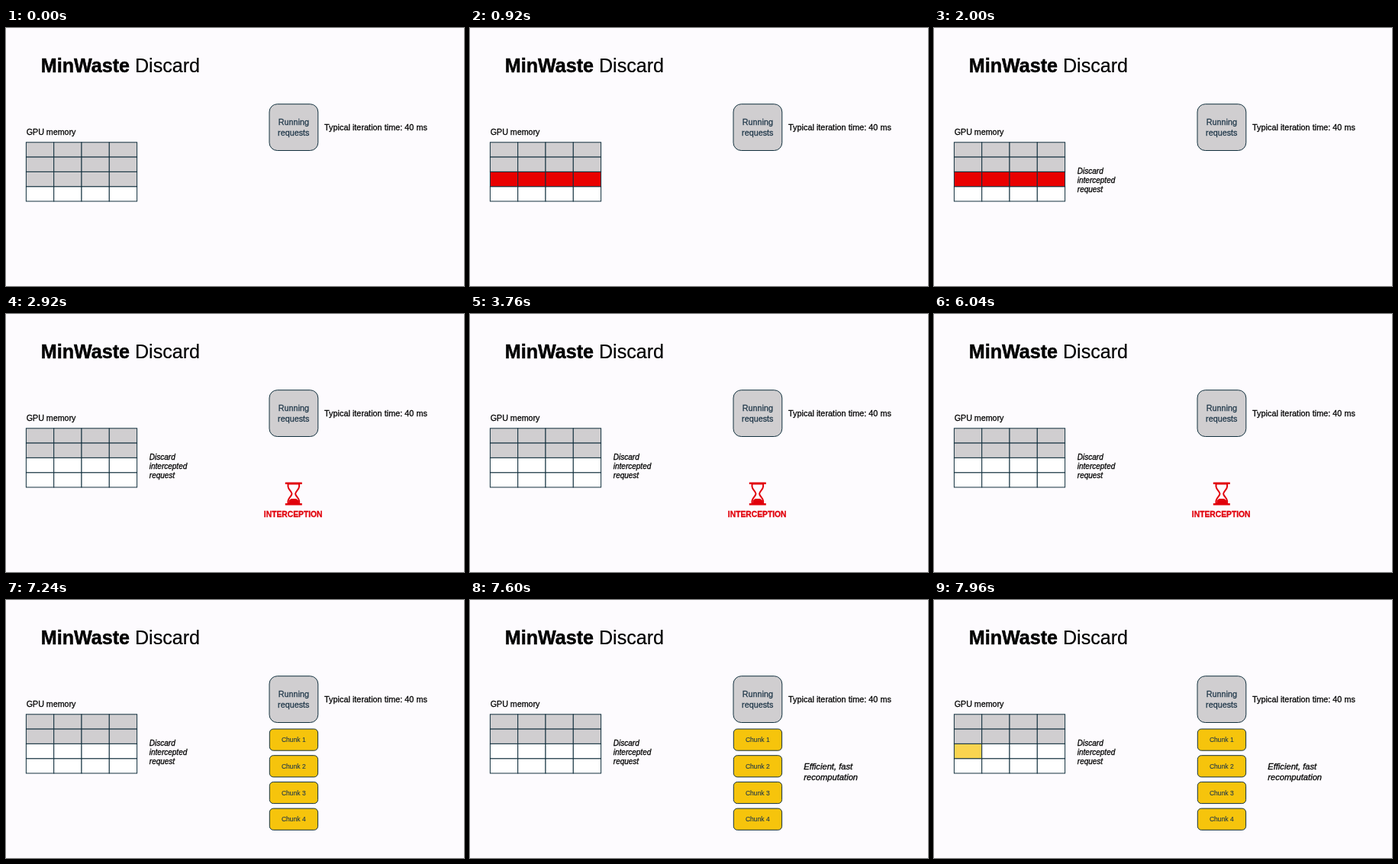
These frames come from a looping animation (600 px wide and 338 px high, 8000 ms). An HTML page:

```html
<!DOCTYPE html>
<html lang="en">
<head>
<meta charset="utf-8">
<title>MinWaste Discard</title>
<style>
  html, body { margin: 0; width: 100%; height: 100%; overflow: hidden; background: #fdfbfe; }
  svg { display: block; width: 100%; height: 100%; }
  text { font-family: "Liberation Sans", Arial, sans-serif; }
  .title { stroke: #000; stroke-width: .2px; }
  .strong { font-weight: bold; stroke-width: .5px; }
  .body { fill: #000; stroke: #000; stroke-width: .28px; }
  .it { font-style: italic; }
  .mid { text-anchor: middle; }
  .navy { fill: #20384a; stroke: #20384a; stroke-width: .28px; }
  .small { stroke-width: .12px; }
  .line { stroke: #12303e; stroke-width: 1; }
</style>
</head>
<body>
<svg id="stage" viewBox="0 0 600 338">
  <rect width="600" height="338" fill="#fdfbfe"/>
  <text class="title" x="45.8" y="58.4" font-size="25.1"><tspan class="strong">MinWaste</tspan> Discard</text>

  <text class="body" x="26.7" y="139.5" font-size="10.7">GPU memory</text>
  <g id="grid"></g>
  <g id="discard" class="body it" font-size="10">
    <text x="187.8" y="190.6">Discard</text>
    <text x="187.8" y="202.5">intercepted</text>
    <text x="187.8" y="214.5">request</text>
  </g>

  <rect class="line" x="345" y="99.7" width="63.8" height="60.8" rx="10.3" fill="#d0ced0"/>
  <g class="navy mid" font-size="10.8">
    <text x="376.8" y="127">Running</text>
    <text x="376.8" y="140.5">requests</text>
  </g>
  <text class="body" x="417" y="134.2" font-size="10.9">Typical iteration time: 40 ms</text>

  <g id="wait" fill="#e1000b" stroke="#e1000b" stroke-width="0">
    <path d="M365.8 220.5h22v2.4h-22z M365.8 248h22v2.4h-22z"/>
    <path d="M369.5 222.5v3.5c0 3.6 5 6.6 5 9.4s-5 5.8-5 9.4v3.5h14.6v-3.5c0-3.6-5-6.6-5-9.4s5-5.8 5-9.4v-3.5z"
      fill="#fdfbfe" stroke-width="2"/>
    <path d="M370.5 248.5v-4.2l3-2.4h6.6l3 2.4v4.2z"/>
    <text class="mid" x="376.2" y="265.7" font-size="10.3" font-weight="bold" stroke-width=".3">INTERCEPTION</text>
  </g>

  <g id="chunks"></g>
  <g id="fast" class="body it" font-size="11.2">
    <text x="437.2" y="222.4">Efficient, fast</text>
    <text x="437.2" y="236.2">recomputation</text>
  </g>
</svg>
<script>
const LOOP = 8000;
const GRID = { x: 26.4, y: 149.8, w: 36.3, h: 19.3 };
const $ = id => document.getElementById(id);

function add(parent, tag, attrs, label) {
  const el = document.createElementNS("http://www.w3.org/2000/svg", tag);
  for (const k in attrs) el.setAttribute(k, attrs[k]);
  if (label) el.textContent = label;
  return parent.appendChild(el);
}

function cell(row, col, fill) {
  return add($("grid"), "rect", {
    class: "line", fill,
    x: GRID.x + col * GRID.w, y: GRID.y + row * GRID.h,
    width: GRID.w, height: GRID.h
  });
}

function cellRow(row, fill) {
  return [0, 1, 2, 3].map(col => cell(row, col, fill));
}

cellRow(0, "#d0ced0");
cellRow(1, "#d0ced0");
cellRow(3, "#fff");
const requestRow = cellRow(2, "#fff");

for (let i = 0; i < 4; i++) {
  const y = 169 + i * 34.7;
  add($("chunks"), "rect", { class: "line", x: 345.3, y, width: 63.3, height: 28.2, rx: 5, fill: "#f6c40c" });
  add($("chunks"), "text", { class: "navy mid small", x: 376.8, y: y + 17.1, "font-size": 8.5 }, "Chunk " + (i + 1));
}

const GREY = [208, 206, 208], RED = [232, 0, 0], WHITE = [255, 255, 255], GOLD = [246, 196, 12];
const fade = (t, start, span) => Math.min(1, Math.max(0, (t - start) / span));
const mix = (a, b, k) => `rgb(${a.map((v, i) => Math.round(v + (b[i] - v) * k))})`;
const show = (id, on) => $(id).setAttribute("visibility", on ? "visible" : "hidden");

function draw(t) {
  const freed = t >= 2720;
  requestRow.forEach((el, col) => {
    let fill = mix(GREY, RED, fade(t, 200, 500));
    if (freed) fill = mix(WHITE, GOLD, col ? 0 : fade(t, 7600, 500));
    el.setAttribute("fill", fill);
  });
  show("discard", t >= 1840);
  show("wait", freed && t < 6400);
  show("chunks", t >= 6400);
  show("fast", t >= 7480);
}

const begin = performance.now();
function tick() {
  draw((performance.now() - begin) % LOOP);
  requestAnimationFrame(tick);
}
draw(0);
requestAnimationFrame(tick);
</script>
</body>
</html>
```
